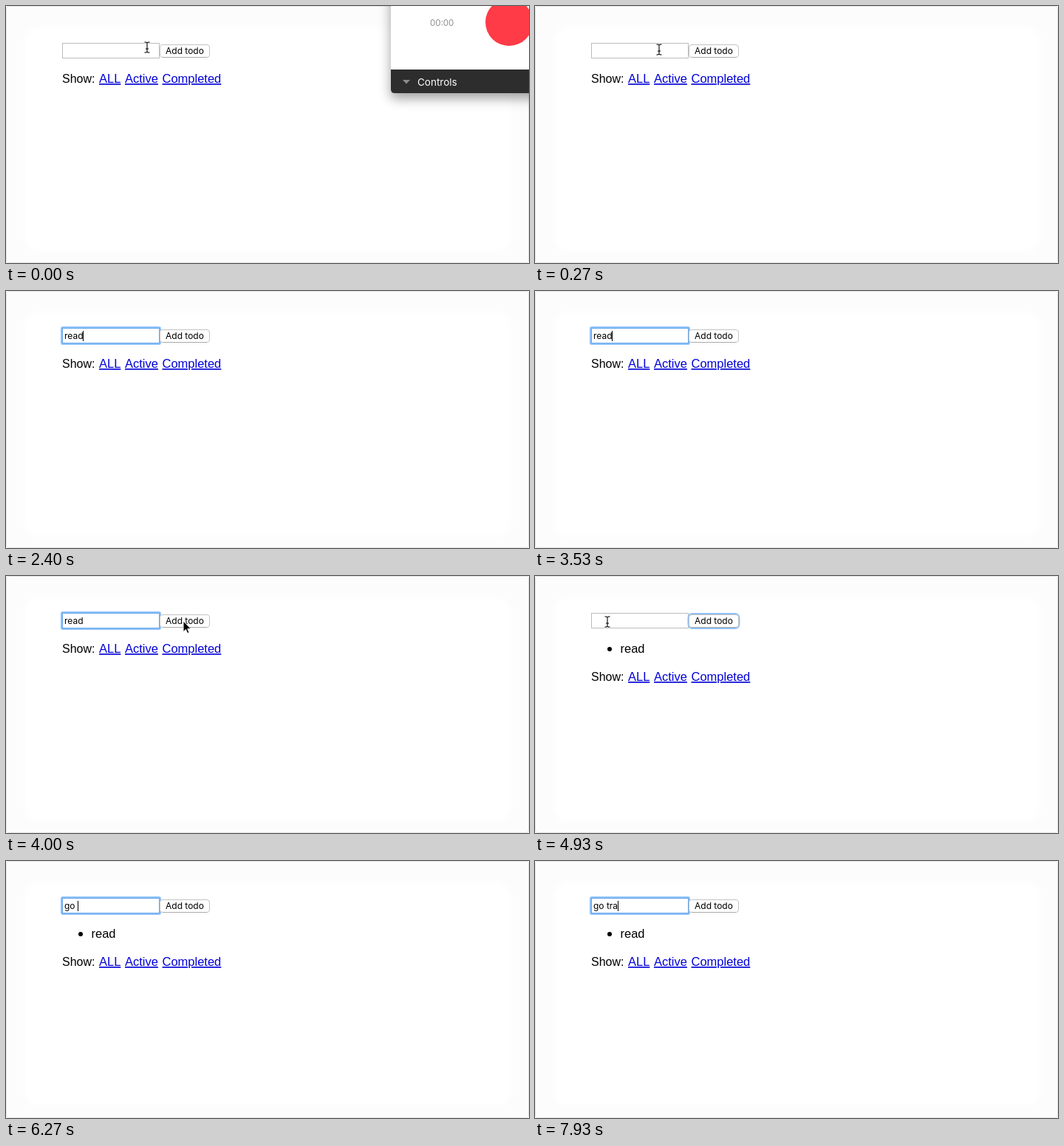
These frames come from a looping animation (708 by 348 pixels, 8000 ms). An HTML page:

```html
<!DOCTYPE html>
<html lang="en">
<head>
<meta charset="utf-8">
<title>Todo list</title>
<style>
  html, body { margin: 0; width: 100%; height: 100%; overflow: hidden; background: #fff; }
  svg { display: block; width: 708px; height: 348px; }
  text { white-space: pre; }
  .page { font: 16.5px "Liberation Sans", Arial, sans-serif; }
  .ui { font: 12px Inter, sans-serif; }
  .link { fill: #0000d8; text-decoration: underline; }
  .ring { fill: none; stroke: #8fc1f7; stroke-width: 3; }
</style>
</head>
<body>
<svg viewBox="0 0 708 348">
  <defs>
    <filter id="soft"><feGaussianBlur stdDeviation="3"/></filter>
    <filter id="shade" x="-20%" y="-20%" width="140%" height="150%">
      <feDropShadow dx="0" dy="7" stdDeviation="8" flood-opacity=".38"/>
    </filter>
    <linearGradient id="press" x2="0" y2="1">
      <stop stop-color="#6bb0f8"/><stop offset="1" stop-color="#1a70ee"/>
    </linearGradient>
  </defs>

  <rect width="708" height="348" fill="#fff"/>
  <rect x=".5" y=".5" width="707" height="347" rx="3" fill="#fcfcfc" stroke="#e4e4e4"/>
  <rect x="26" y="29" width="657" height="303" rx="18" fill="#fff" filter="url(#soft)"/>

  <rect x="76.5" y="50.5" width="131" height="20" fill="#fff" stroke="#bcbcbc"/>
  <g id="fieldRing">
    <rect class="ring" x="75.5" y="49.5" width="133" height="22" rx="1.5"/>
    <rect x="76.5" y="50.5" width="131" height="20" fill="none" stroke="#62a5ea"/>
  </g>
  <text id="entry" class="ui" x="79" y="65"></text>
  <rect id="caret" y="54" width="1" height="14"/>

  <rect id="buttonRing" class="ring" x="208" y="51.5" width="68" height="19" rx="5"/>
  <rect id="button" x="208.5" y="52.5" width="67" height="17" rx="3.5" fill="#fff" stroke="#c3c3c3"/>
  <path id="buttonEdge" d="M212 69.5H272" stroke="#a9a9a9"/>
  <text id="label" class="ui" x="216" y="65">Add todo</text>

  <g id="item" class="page">
    <circle cx="101" cy="99" r="3"/>
    <text x="115.5" y="104">read</text>
  </g>
  <g id="filters" class="page">
    <text x="76" y="104" font-size="16">Show:</text>
    <text class="link" x="126" y="104">ALL</text>
    <text class="link" x="161" y="104">Active</text>
    <text class="link" x="211.5" y="104">Completed</text>
  </g>

  <g id="panel">
    <rect x="521" y="-20" width="230" height="138" rx="5" fill="#fff" filter="url(#shade)"/>
    <path d="M521 86H708V118H526Q521 118 521 113Z" fill="#2d2d2d"/>
    <text x="574" y="27" font-family="Inter, sans-serif" font-size="11.5" fill="#8e8e8e">00:00</text>
    <circle cx="681" cy="22" r="32" fill="#ff3b47"/>
    <path d="M537 100H547L542 105.5Z" fill="#8b8b8b"/>
    <text x="557" y="108" font-family="Inter, sans-serif" font-size="13.5" fill="#fff">Controls</text>
  </g>

  <g id="beam" fill="none" stroke-linecap="square">
    <path d="M-3 -7H-1.5L0 -6L1.5 -7H3M0 -6V6M-3 7H-1.5L0 6L1.5 7H3M-1.5 2H1.5" stroke="#fff" stroke-width="2.4"/>
    <path d="M-3 -7H-1.5L0 -6L1.5 -7H3M0 -6V6M-3 7H-1.5L0 6L1.5 7H3M-1.5 2H1.5" stroke="#000" stroke-width="1.1"/>
  </g>
  <path id="arrow" d="M0 0V14.5L3.4 11.4L5.7 16.6L8 15.6L5.8 10.6H10.4Z" stroke="#fff"/>
</svg>

<script>
const LOOP = 8000;
const $ = id => document.getElementById(id);

// [time, text, caret x]
const entries = [
  [0, "", null],
  [600, "", 79],
  [1070, "r", 83.5],
  [1270, "re", 90],
  [1700, "rea", 97],
  [2130, "read", 104],
  [4130, "", null],
  [5270, "", 79],
  [5600, "g", 86.5],
  [5900, "go", 93.5],
  [6200, "go ", 97],
  [7000, "go t", 101],
  [7400, "go tr", 105.5],
  [7870, "go tra", 112],
];

// [time, x, y]
const travels = [
  [[0, 191, 56], [270, 168, 59], [500, 160, 60], [1070, 160, 60]],
  [[3560, 160, 60], [3930, 240, 61], [4400, 240, 61], [4800, 110, 62],
   [4930, 98, 62], [5600, 96, 62]],
];

const show = (id, on) => $(id).setAttribute("visibility", on ? "visible" : "hidden");
const within = (t, from, to) => t >= from && t < to;

function pointerAt(t) {
  const path = travels.find(p => within(t, p[0][0], p.at(-1)[0]));
  if (!path) return null;
  const i = path.findIndex(p => p[0] > t);
  const [a, b] = [path[i - 1], path[i]];
  const k = (t - a[0]) / (b[0] - a[0]);
  const ease = k * k * (3 - 2 * k);
  return [1, 2].map(n => a[n] + (b[n] - a[n]) * ease);
}

function drawPointer(t) {
  const pos = pointerAt(t);
  const overField = pos && pos[0] < 208;
  show("beam", pos && overField);
  show("arrow", pos && !overField);
  if (pos) $(overField ? "beam" : "arrow")
    .setAttribute("transform", `translate(${pos.map(Math.round)})`);
}

function drawEntry(t) {
  const [since, text, x] = entries.findLast(e => e[0] <= t);
  const focused = x !== null;
  $("entry").textContent = text;
  show("fieldRing", focused);
  show("caret", focused && (t - since) % 1000 < 500);
  if (focused) $("caret").setAttribute("x", x);
}

function drawButton(t) {
  const pressed = within(t, 4050, 4130);
  show("buttonRing", within(t, 4130, 5270));
  show("buttonEdge", !pressed);
  $("button").setAttribute("fill", pressed ? "url(#press)" : "#fff");
  $("label").setAttribute("fill", pressed ? "#fff" : "#000");
}

function draw(t) {
  const added = t >= 4130;
  show("item", added);
  $("filters").setAttribute("transform", `translate(0 ${added ? 38 : 0})`);
  $("panel").setAttribute("opacity", t < 70 ? 1 : t < 130 ? .5 : t < 200 ? .2 : 0);
  drawEntry(t);
  drawButton(t);
  drawPointer(t);
}

const start = performance.now();
function tick() {
  draw((performance.now() - start) % LOOP);
  requestAnimationFrame(tick);
}
tick();
</script>
</body>
</html>
```
